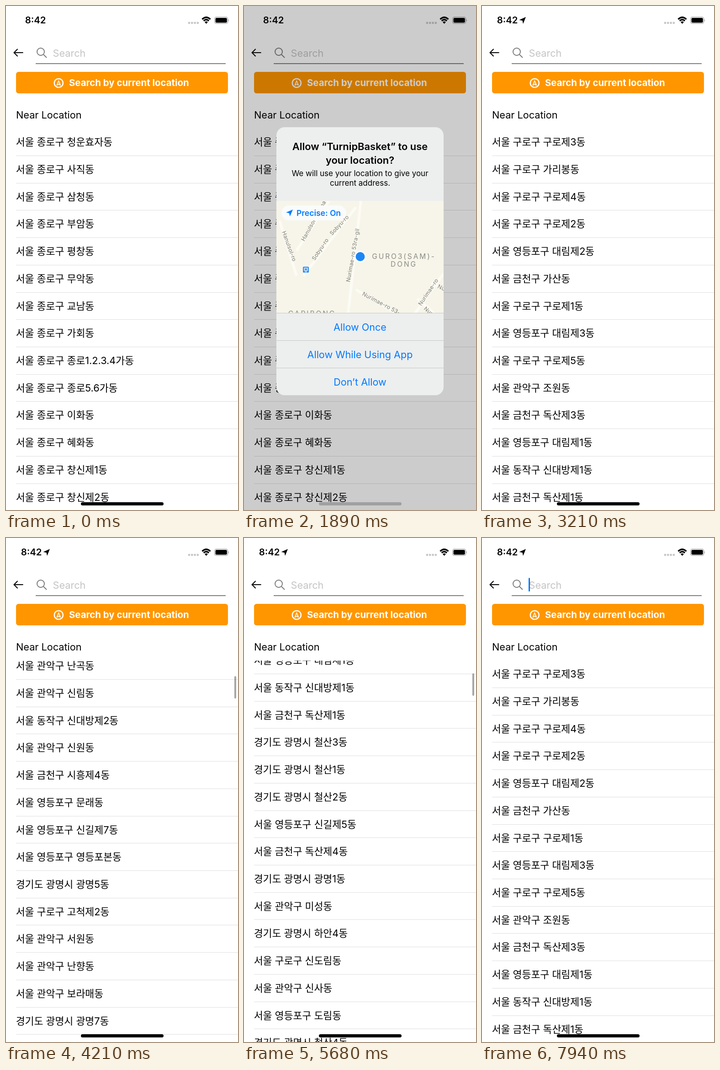
These frames come from a looping animation (508 px wide and 1102 px high, 8 s). An HTML page:

```html
<!DOCTYPE html>
<html lang="ko">
<head>
<meta charset="utf-8">
<title>Location search</title>
<style>
  html, body { margin: 0; width: 100%; height: 100%; overflow: hidden; background: #fff; }
  body { font: 21.67px/30px Inter, "Noto Sans CJK KR", "Noto Sans CJK", sans-serif; color: #000; }
  #stage { position: relative; width: 508px; height: 1102px; overflow: hidden; background: #fff; }
  #stage div, #stage svg { position: absolute; }
  #stage div { white-space: nowrap; }
  .fill { inset: 0; }
  #clock { top: 16px; left: .7px; font-size: 20.3px; font-weight: 600; }
  #hint { left: 102.5px; top: 88px; color: #c4c4c6; }
  #cursor { left: 102px; top: 87px; width: 3px; height: 30px; border-radius: 1.5px; background: #007aff; }
  #underline { left: 65px; top: 124.6px; width: 416px; height: 2.6px; background: #808080; }
  #button { left: 21.67px; top: 143.8px; width: 464.65px; height: 47.6px; border-radius: 5.5px; background: #ff9600; }
  #button div { left: 116.3px; top: 9.7px; color: #fff; font-size: 20.4px; font-weight: 700; }
  #near { left: 22px; top: 223px; }
  #list { left: 0; top: 268.3px; width: 508px; height: 834px; overflow: hidden; }
  .row { left: 21.67px; right: 0; height: 59.72px; line-height: 59.72px; box-sizing: border-box; border-bottom: 1px solid #dedede; }
  #thumb { left: 500px; width: 4.2px; height: 49px; border-radius: 2.1px; background: rgba(0,0,0,.35); }
  #dim { background: #000; }
  #alert { left: 71px; top: 265px; width: 366px; height: 586px; border-radius: 18px; overflow: hidden; }
  #panel { background: #edeeee; }
  #map { left: 0; top: 161px; width: 366px; height: 245px; overflow: hidden; }
  #map svg { left: 0; top: 0; width: 366px; height: 245px; }
  .line { left: 0; width: 366px; text-align: center; }
  .title { font-size: 21.9px; font-weight: 600; }
  .body { font-size: 17px; }
  .choice { left: 0; width: 366px; height: 60px; line-height: 60px; box-sizing: border-box; text-align: center; color: #007aff; font-size: 21.6px; border-top: 1px solid #c6c8c8; }
  #pill { left: 11px; top: 171px; width: 142px; height: 33px; border-radius: 17px; background: #fafbfb; color: #007aff; font-size: 17.5px; font-weight: 600; line-height: 33px; text-indent: 33px; }
  #home { left: 164px; top: 1084.5px; width: 181px; height: 7px; border-radius: 3.5px; }
  .road { fill: none; stroke: #f9d699; stroke-width: 1.4; }
  .street { fill: none; stroke: #fcfbf4; stroke-width: 6; }
  .street-name { font-size: 12px; fill: #7c7c76; letter-spacing: .3px; }
  .district { font-size: 15.5px; fill: #8b8b86; letter-spacing: 2.9px; text-anchor: middle; }
</style>
</head>
<body>
<div id="stage">
  <div id="clock">8:42</div>
  <svg class="fill" width="508" height="200" fill="none" stroke="#000">
    <path id="fix" d="M96 24 90 39 88.5 32 81.5 30.5Z" fill="#000" stroke="none"/>
    <g fill="#c6c6c6" stroke="none">
      <circle cx="401" cy="37" r="2.4"/><circle cx="407.3" cy="37" r="2.4"/>
      <circle cx="413.6" cy="37" r="2.4"/><circle cx="419.9" cy="37" r="2.4"/>
    </g>
    <path d="M429.5 29Q438.5 20.5 447.5 29M432.8 32.5Q438.5 27 444.2 32.5" stroke-width="3.2"/>
    <path d="M435 35Q438.5 32 442 35L438.5 39Z" fill="#000" stroke="none"/>
    <rect x="456.7" y="24.2" width="29" height="14.2" rx="4" stroke="#a2a2a2" stroke-width="1.3"/>
    <rect x="458.6" y="26.1" width="25.2" height="10.4" rx="2.3" fill="#000" stroke="none"/>
    <path d="M487 29Q489.4 31.3 487 33.6Z" fill="#a2a2a2" stroke="none"/>
    <path d="M37.5 102H17.5M25.5 94 17.5 102 25.5 110" stroke-width="2"/>
    <g stroke="#7d7d7d" stroke-width="2"><circle cx="76" cy="100" r="8"/><path d="M82 106 89 113"/></g>
  </svg>
  <div id="hint">Search</div>
  <div id="cursor"></div>
  <div id="underline"></div>
  <div id="button">
    <svg width="120" height="48" fill="none" stroke="#fff">
      <circle cx="93.3" cy="24.4" r="9.5" stroke-width="2.5"/>
      <path d="M89.5 29 93.3 19.5 97.1 29 93.3 27Z" stroke-width="1.8" stroke-linejoin="round"/>
    </svg>
    <div>Search by current location</div>
  </div>
  <div id="near">Near Location</div>
  <div id="list"><div id="before" class="fill"></div><div id="after" class="fill"></div></div>
  <div id="thumb"></div>
  <div id="dim" class="fill"></div>
  <div id="alert">
    <div id="panel" class="fill"></div>
    <div id="map">
      <svg id="country" viewBox="62 419 385 258" preserveAspectRatio="none">
        <path fill="#c1e8f2" d="M62 419H447V677H62Z"/>
        <g fill="#f5f7f2">
          <path d="M148 419 166 429 192 440 206 468 200 478 212 488 207 500 215 506 204 513 208 526 214 541 206 552 212 566 197 575 205 585 194 590 203 603 207 613 225 607 232 617 240 605 250 610 262 598 272 602 282 588 295 584 308 578 312 565 319 545 314 540 316 510 312 488 299 465 283 440 273 419Z"/>
          <ellipse cx="209" cy="660" rx="13.5" ry="6" transform="rotate(-12 209 660)"/>
          <path d="M447 565 432 576 418 579 405 599 375 610 359 623 370 632 398 622 424 630 447 614ZM322 677 331 660 346 652 348 641 364 634 381 640 391 655 404 648 412 660 409 677ZM447 626 428 637 412 656 423 667 417 677H447ZM316 603 312 614 309 626 314 618Z"/>
        </g>
        <g class="road">
          <path d="M212 472 220 466 230 472 226 483 214 482ZM220 466 240 462 282 452M230 472 255 500 282 515 312 535M222 482 222 520 230 550 222 590M226 483 240 515 270 530 300 578M214 482 213 515 210 570 205 600M240 515 222 520 212 548M230 550 268 555 304 578M222 590 250 582 300 578M255 500 310 500M270 530 285 485 282 445M245 462 248 535 240 555 250 582M285 485 310 495 314 540 300 578M268 555 270 530M225 437 222 465M230 550 212 565"/>
          <path d="M212 470 230 476M212 477 228 468M291 574 306 579M296 583 303 570" stroke-width="3"/>
          <path d="M228 440 240 433 256 435 270 430 280 434" stroke="#bfa58a" stroke-width="1.2"/>
          <path d="M364 623 400 608 430 592 447 578M405 604 428 612 447 600M328 670 350 661 376 672 405 663M350 661 357 644M358 650 366 677M440 636 428 677M376 672 380 645" stroke="#b5dfb5"/>
        </g>
      </svg>
      <svg id="streets" viewBox="71 426 366 245">
        <path fill="#f7f5e9" d="M71 426H437V671H71Z"/>
        <path class="street" d="M78 470 115 590M115 535 190 420M130 590 245 440M228 671 256 426M245 620 340 676M370 678 437 585M380 640 420 676M410 605 440 620"/>
        <g id="labels">
          <g class="street-name">
            <text transform="translate(83 494) rotate(70)">Hanulsol-ro</text>
            <text transform="translate(132 515) rotate(-61)">Hanulsol-ro 8ma-gil</text>
            <text transform="translate(193 502) rotate(-47)">Sobyu-ro</text>
            <text transform="translate(155 557) rotate(-56)">Sobyu-ro</text>
            <text transform="translate(232 604) rotate(-80)">Nurimae-ro 53ra-gil</text>
            <text transform="translate(258 632) rotate(28)">Nurimae-ro 53-gil</text>
            <text transform="translate(388 656) rotate(-56)">Nurimae-ro</text>
            <text transform="translate(393 663) rotate(40)">Nurimae-ro</text>
            <text transform="translate(423 616) rotate(25)">Nurimae-ro</text>
          </g>
          <g class="district">
            <text x="350" y="553.5">GURO3(SAM)-</text><text x="350" y="570">DONG</text>
            <text x="149" y="678">GARIBONG</text>
          </g>
          <rect x="129" y="570" width="13" height="13" rx="2" fill="#2b8df0"/>
          <path d="M132 573H139V578H132ZM133 581H138" fill="none" stroke="#fff" stroke-width="1.3"/>
        </g>
        <circle cx="254.5" cy="548" r="13" fill="#fff"/><circle cx="254.5" cy="548" r="10" fill="#1d86f5"/>
      </svg>
    </div>
    <div id="words" class="fill">
      <div class="line title" style="top:26.5px">Allow “TurnipBasket” to use</div>
      <div class="line title" style="top:56.5px">your location?</div>
      <div class="line body" style="top:85.5px">We will use your location to give your</div>
      <div class="line body" style="top:107px">current address.</div>
      <div id="pill">Precise: On<svg style="left:9px;top:8px;width:17px;height:17px" viewBox="0 0 17 17"><path fill="#007aff" d="M16 1 9.5 16 8 9 1 7.5Z"/></svg></div>
      <div class="choice" style="top:406px">Allow Once</div>
      <div class="choice" id="allow" style="top:466px">Allow While Using App</div>
      <div class="choice" style="top:526px">Don’t Allow</div>
    </div>
  </div>
  <div id="home"></div>
</div>
<script>
const LOOP = 8000, ROW = 59.72, PEAK = 2457;
const $ = id => document.getElementById(id);
const clamp = x => Math.min(1, Math.max(0, x));
const ramp = (t, from, to) => clamp((t - from) / (to - from));
const mix = (a, b, x) => a + (b - a) * x;

const first = '청운효자동,사직동,삼청동,부암동,평창동,무악동,교남동,가회동,종로1.2.3.4가동,종로5.6가동,이화동,혜화동,창신제1동,창신제2동'
  .split(',').map(name => '종로구 ' + name);
const nearby = `구로구 구로제3동,구로구 가리봉동,구로구 구로제4동,구로구 구로제2동,영등포구 대림제2동,금천구 가산동,구로구 구로제1동,영등포구 대림제3동,구로구 구로제5동,관악구 조원동,금천구 독산제3동,영등포구 대림제1동,동작구 신대방제1동,금천구 독산제1동,광명시 철산3동,광명시 철산1동,광명시 철산2동,영등포구 신길제5동,금천구 독산제4동,광명시 광명1동,관악구 미성동,광명시 하안4동,구로구 신도림동,관악구 신사동,영등포구 도림동,광명시 철산4동,금천구 독산제2동,영등포구 신길제3동,광명시 하안2동,구로구 고척제1동,영등포구 신길제6동,광명시 하안1동,광명시 광명3동,광명시 광명2동,영등포구 신길제4동,광명시 광명4동,관악구 난곡동,관악구 신림동,동작구 신대방제2동,관악구 신원동,금천구 시흥제4동,영등포구 문래동,영등포구 신길제7동,영등포구 영등포본동,광명시 광명5동,구로구 고척제2동,관악구 서원동,관악구 난향동,관악구 보라매동,광명시 광명7동,금천구 시흥제1동,광명시 하안3동,구로구 개봉제2동,영등포구 신길제1동,광명시 광명6동,구로구 개봉제3동`.split(',');

function fillList(box, names) {
  names.forEach((name, i) => {
    const row = document.createElement('div');
    row.className = 'row';
    row.style.top = i * ROW + 'px';
    row.textContent = (name.startsWith('광명시') ? '경기도 ' : '서울 ') + name;
    box.append(row);
  });
}
fillList($('before'), first);
fillList($('after'), nearby);

// The screen refreshes only at these moments.
const ticks = [0, 1000, 1060, 1200, 1290, 1380, 1480, 1580, 1690, 1790, 1890, 1990,
  2090, 2190, 2290, 2390, 2500, 2590, 2690, 2780, 2900, 2980, 3060, 3130, 3210,
  3910, 4010, 4110, 4210, 4290, 4390, 4490, 4590, 4690, 4790,
  4940, 5010, 5090, 5190, 5290, 5380, 5480, 5580, 5680, 5810, 5900, 6000, 6090,
  6240, 6320, 6400, 6480, 6550, 6630, 7540, 7760, 7850, 7940];
const lastTick = t => ticks.filter(k => k <= t).pop();

// Flick down, flick back with friction, second flick, rubber-band at the top.
function scrollAt(t) {
  const glide = x => 467 + 717 * Math.exp((5090 - x) / 500);
  if (t < 3900 || t >= 6630) return 0;
  if (t < 4500) return PEAK * (1 - (1 - ramp(t, 3900, 4500)) ** 2.945);
  if (t < 4700) return mix(PEAK, glide(4700), ramp(t, 4500, 4700) ** 1.4);
  if (t < 5820) return glide(t);
  if (t < 6060) return mix(glide(5820), 0, ramp(t, 5820, 6060) ** 1.5);
  const x = (t - 6060) / 80;
  return -70 * x * Math.exp(1 - x);
}

function drawAlert(t) {
  const enter = t < 1200 ? 0 : 1 - Math.exp((1180 - t) / 85);
  const leave = t < 2290 ? 1 : t < 2780 ? Math.exp((2290 - t) / 100) : 0;
  $('dim').style.opacity = .2 * enter * leave ** 1.2;
  $('alert').style.transform = `scale(${1 + .19 * (1 - enter)})`;
  $('panel').style.opacity = enter * leave ** 2;
  $('map').style.opacity = Math.min(1, enter * 1.36) * leave ** .7;
  $('words').style.opacity = enter * leave;
  $('streets').style.opacity = t >= 1580 ? 1 : 0;
  $('labels').style.opacity = t >= 1690 ? 1 : 0;
  $('allow').style.background = t >= 2090 && t < 2290 ? '#d8d9d9' : 'none';
  const grey = t < 2390 ? 160 * enter : 180 * ramp(t, 2720, 2390);
  $('home').style.background = `rgb(${grey},${grey},${grey})`;
}

function draw(t) {
  const offset = scrollAt(t);
  drawAlert(t);
  $('button').style.opacity = t >= 1000 && t < 1060 ? .8 : 1;
  $('clock').style.transform = `translateX(${mix(41, 32, ramp(t, 2370, 2500))}px)`;
  $('fix').style.opacity = ramp(t, 2400, 2690);
  $('before').style.visibility = t < 2900 ? 'visible' : 'hidden';
  $('after').style.visibility = t < 2900 ? 'hidden' : 'visible';
  $('after').style.transform = `translateY(${-offset}px)`;
  $('thumb').style.top = 293.3 + .0038 * Math.max(0, offset) + 'px';
  $('thumb').style.opacity = t < 3910 ? 0 : 1 - ramp(t, 6400, 6630);
  $('cursor').style.opacity = t >= 7760 ? 1 : 0;
}

const start = performance.now();
function frame() {
  draw(lastTick((performance.now() - start) % LOOP));
  requestAnimationFrame(frame);
}
frame();
</script>
</body>
</html>
```
